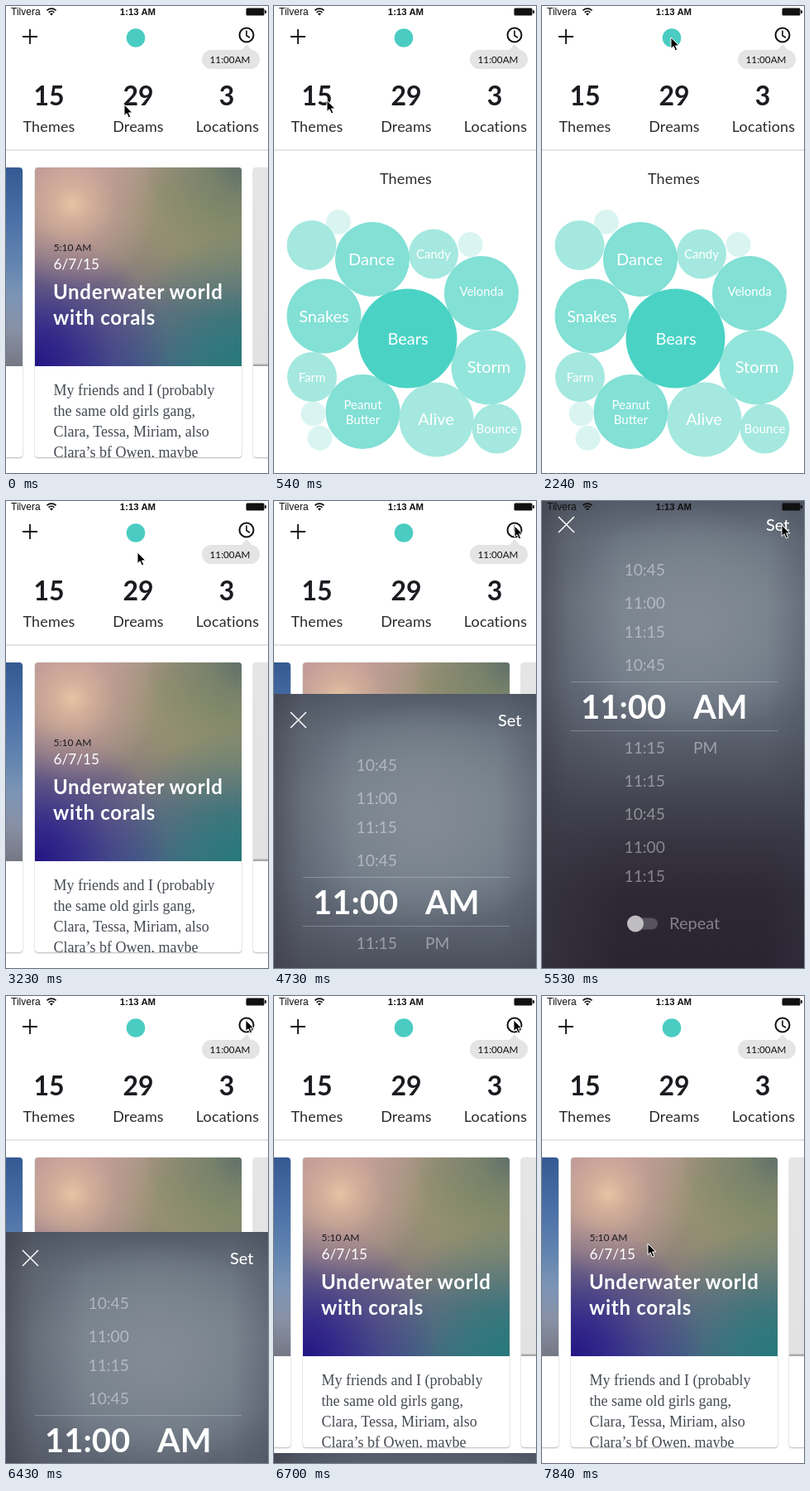
Animation, 317 px wide and 564 px high, one loop 8 s. Source, as an HTML page:

```html
<!DOCTYPE html>
<html lang="en">
<head>
<meta charset="utf-8">
<title>Dream journal</title>
<style>
  html, body { margin: 0; width: 100%; height: 100%; overflow: hidden; background: #fff; }
  .stage { position: relative; width: 317px; height: 564px; overflow: hidden; font-family: Lato, "Open Sans", sans-serif; }
  svg { position: absolute; left: 0; top: 0; width: 317px; height: 564px; overflow: visible; }
  .mid { text-anchor: middle; }
  .layer { position: absolute; inset: 0; }

  .cards { animation: cards 8s step-end infinite; }
  .themes { opacity: 0; animation: themes 8s step-end infinite; }
  @keyframes cards { 0% { opacity: 1 } 6.75% { opacity: 0 } 30.25%, 100% { opacity: 1 } }
  @keyframes themes { 0% { opacity: 0 } 6.75% { opacity: 1 } 30.25%, 100% { opacity: 0 } }

  .card { position: absolute; top: 195px; width: 250px; height: 350px; border-radius: 4px; overflow: hidden;
    background: #fff; box-shadow: 0 1px 2px rgba(0, 0, 0, .28), 0 0 1px rgba(0, 0, 0, .2); }
  .card::before { content: ""; display: block; height: 240px; background: var(--art); }
  .prev { left: -230px; --art: linear-gradient(#355a93, #4a6fa6 25%, #6184b0 48%, #7c95b6 65%, #8890a4 82%, #757784); }
  .next { left: 299px; --art: linear-gradient(#e5e5e5, #e2e2e2 98.5%, #a5a5a5 99.5%); }
  .main { left: 35px; --art:
    radial-gradient(circle at 45px 44px, #e6c3a2 0, #dcb59dcc 22px, #cca39a77 55px, #c49c9c00 105px),
    radial-gradient(circle at 0 100%, #241584 0, #30238add 45px, #42388a88 95px, #5a4f8a00 165px),
    radial-gradient(circle at 100% 100%, #27797a 0, #307a7bdd 45px, #42797988 95px, #5b7a7500 160px),
    radial-gradient(circle at 100% 0, #5f7169 0, #6b7a68aa 40px, #84886a00 120px),
    radial-gradient(ellipse 165px 125px at 218px 55px, #93956a, #8e9069bb 45%, #88886c00),
    linear-gradient(#bb9999, #ad928c 25%, #938281 45%, #7b737f 62%, #5f6484 82%, #455a89); }

  .panel { position: absolute; left: 0; top: -3px; width: 317px; height: 570px;
    transform: translateY(567px); animation: panel 8s step-end infinite;
    background:
      linear-gradient(90deg, #3a3a4599, #41424e44 34px, #4b4e5a00 95px),
      linear-gradient(270deg, #3b3f4c44, #4b4e5a00 45px),
      radial-gradient(ellipse 160px 140px at 180px 150px, #838c96, #7f8993aa 55%, #737d8900),
      linear-gradient(#535b68, #69737f 9%, #747e8a 22%, #6c7683 38%, #5a606d 50%, #484a57 61%, #383642 72%, #2d2834 84%, #2a2431); }
  .panel svg { top: 3px; }
  @keyframes panel {
    0% { transform: translateY(567px) }
    58% { transform: translateY(425px) }
    59.125% { transform: translateY(236px) }
    60.25% { transform: translateY(103px) }
    61.375% { transform: translateY(42px) }
    62.5% { transform: translateY(14px) }
    63.6% { transform: translateY(4px) }
    64.625% { transform: translateY(0) }
    80.375% { transform: translateY(288px) }
    81.5% { transform: translateY(440px) }
    82.625% { transform: translateY(520px) }
    83.75% { transform: translateY(555px) }
    84.875%, 100% { transform: translateY(567px) }
  }

  .cursor { width: 14px; height: 19px; animation: cursor 8s step-end infinite; }
  @keyframes cursor {
    0% { transform: translate(142px, 118px); animation-timing-function: steps(2) }
    2.25% { transform: translate(154px, 113px) }
    6.75% { transform: translate(63px, 113px) }
    19.01% { transform: translate(63px, 113px); animation-timing-function: steps(2) }
    21.25% { transform: translate(80px, 103px); animation-timing-function: steps(3) }
    24.625% { transform: translate(131px, 64px); animation-timing-function: steps(3) }
    28% { transform: translate(155px, 37px) }
    40.375% { transform: translate(158px, 61px); animation-timing-function: steps(3) }
    43.71% { transform: translate(178px, 135px); animation-timing-function: steps(3) }
    47.04% { transform: translate(222px, 163px); animation-timing-function: steps(3) }
    50.375% { transform: translate(261px, 99px); animation-timing-function: steps(2) }
    52.575% { transform: translate(270px, 66px); animation-timing-function: steps(3) }
    55.875% { transform: translate(290px, 29px) }
    69.125% { transform: translate(289px, 28px) }
    86% { transform: translate(289px, 28px); animation-timing-function: steps(3) }
    89.3% { transform: translate(262px, 70px); animation-timing-function: steps(4) }
    93.7% { transform: translate(165px, 215px); animation-timing-function: steps(2) }
    95.9% { transform: translate(121px, 272px) }
    97% { transform: translate(127px, 284px) }
    98%, 100% { transform: translate(127px, 298px) }
  }
</style>
</head>
<body>
<div class="stage">
  <!-- header -->
  <svg viewBox="0 0 317 564" fill="#1b1b20">
    <path d="M20 37H38M29 28V46" stroke="#111" stroke-width="1.8"/>
    <circle cx="157" cy="38.5" r="11.3" fill="#4accc2"/>
    <g fill="none" stroke="#111" stroke-width="2">
      <circle cx="291" cy="35" r="8.5"/>
      <path d="M291 29.5V35.8L295 38.3" stroke-width="1.6"/>
    </g>
    <path d="M284 54L291 46L298 54Z" fill="#e4e4e4"/>
    <rect x="237" y="53" width="70" height="23" rx="11.5" fill="#e4e4e4"/>
    <text class="mid" x="271" y="69" font-size="11.7" fill="#111">11:00AM</text>
    <g class="mid" font-size="32" font-weight="700">
      <text x="52" y="120">15</text><text x="160" y="120">29</text><text x="267" y="120">3</text>
    </g>
    <g class="mid" font-size="18" letter-spacing=".15" fill="#2b2b30">
      <text x="52" y="152">Themes</text><text x="160" y="152">Dreams</text><text x="268" y="152">Locations</text>
    </g>
    <path d="M0 174H317" stroke="#dcdcdc" stroke-width="1.6"/>
  </svg>

  <div class="layer cards">
    <div class="card prev"></div>
    <div class="card main"></div>
    <div class="card next"></div>
    <svg viewBox="0 0 317 564" fill="#fff">
      <clipPath id="face"><rect x="35" y="195" width="250" height="350"/></clipPath>
      <text x="57.5" y="296" font-size="12" fill="#1d1a20">5:10 AM</text>
      <text x="57.5" y="318" font-size="17.2">6/7/15</text>
      <g font-size="24" font-weight="700" letter-spacing=".7">
        <text x="57" y="354">Underwater world</text><text x="57" y="385">with corals</text>
      </g>
      <g clip-path="url(#face)" font-family="'Liberation Serif', Times, serif" font-size="18" fill="#454a52">
        <text x="57.5" y="469.5">My friends and I (probably</text>
        <text x="57.5" y="494.5">the same old girls gang,</text>
        <text x="57.5" y="519.5">Clara, Tessa, Miriam, also</text>
        <text x="57.5" y="544.5">Clara’s bf Owen, maybe</text>
      </g>
    </svg>
  </div>

  <svg class="themes mid" viewBox="0 0 317 564">
    <text x="159.5" y="214.5" font-size="18" letter-spacing=".15" fill="#2b2b30">Themes</text>
    <g fill="#daf5f1">
      <circle cx="78" cy="261" r="15"/><circle cx="237.5" cy="288" r="15"/>
      <circle cx="47.5" cy="492.5" r="15"/><circle cx="55.5" cy="522" r="15"/>
    </g>
    <g fill="#a4e8df">
      <circle cx="45.5" cy="289" r="30"/><circle cx="193" cy="299.5" r="30"/>
      <circle cx="46" cy="448" r="30"/><circle cx="269.5" cy="510.5" r="30"/>
      <circle cx="196.5" cy="499.5" r="45"/>
    </g>
    <g fill="#82e0d5">
      <circle cx="119" cy="306" r="45"/><circle cx="251" cy="347" r="45"/>
      <circle cx="60.5" cy="374.5" r="45"/><circle cx="107.5" cy="490" r="45"/>
    </g>
    <circle cx="259.5" cy="436.5" r="45" fill="#93e5db"/>
    <circle cx="161.5" cy="401.5" r="60" fill="#4ad3c5"/>
    <g fill="#fff" font-size="20">
      <text x="118" y="313">Dance</text><text x="60.5" y="381.5">Snakes</text>
      <text x="162" y="409">Bears</text><text x="260" y="443">Storm</text>
      <text x="196" y="506">Alive</text>
    </g>
    <g fill="#fff" font-size="15">
      <text x="193" y="304.5">Candy</text><text x="251" y="350">Velonda</text>
      <text x="46" y="453.5">Farm</text><text x="107.5" y="486.5">Peanut</text>
      <text x="107.5" y="504.5">Butter</text><text x="269.5" y="515.5">Bounce</text>
    </g>
  </svg>

  <div class="panel">
    <svg viewBox="0 0 317 564" fill="#fff">
      <path d="M20 19L39 38M39 19L20 38" stroke="#fff" stroke-width="1.5"/>
      <text x="299.5" y="35.5" font-size="20" font-weight="500" text-anchor="end">Set</text>
      <g font-size="19.2" fill-opacity=".42">
        <text x="99.5" y="90">10:45</text><text x="99.5" y="130">11:00</text>
        <text x="99.5" y="165">11:15</text><text x="99.5" y="205">10:45</text>
        <text x="99.5" y="305">11:15</text><text x="183" y="305">PM</text>
        <text x="99.5" y="345">11:15</text><text x="99.5" y="385">10:45</text>
        <text x="99.5" y="425">11:00</text><text x="99.5" y="460">11:15</text>
        <text x="154" y="517" font-size="20">Repeat</text>
      </g>
      <path d="M35 218.5H285M35 277.5H285" stroke="#fff" stroke-opacity=".25"/>
      <g font-size="40" font-weight="700">
        <text x="47" y="263">11:00</text><text x="183" y="263">AM</text>
      </g>
      <rect x="103" y="503.5" width="37" height="14" rx="7" fill="#56535e"/>
      <circle cx="113" cy="510.5" r="10" fill="#bebdc1"/>
    </svg>
  </div>

  <!-- status bar -->
  <svg viewBox="0 0 317 564" font-family="'Liberation Sans', Arial, sans-serif" fill="#111">
    <text x="6" y="11" font-size="12">Tilvera</text>
    <g fill="none" stroke="#111" stroke-width="1.7">
      <path d="M49.5 5.4A8 8 0 0 1 60.5 5.4M51.6 7.8A5 5 0 0 1 58.4 7.8"/>
    </g>
    <path d="M53 9.4A3 3 0 0 1 57 9.4L55 11.6Z"/>
    <text class="mid" x="159.5" y="11" font-size="11.4" font-weight="700">1:13 AM</text>
    <rect x="290.5" y="2.5" width="22" height="9" rx="1.5"/>
    <rect x="313" y="5" width="2" height="4" rx="1"/>
  </svg>

  <svg class="cursor" viewBox="0 0 14 19">
    <path d="M1 1V14.6L4.1 11.7L6.4 17L8.8 16L6.5 10.9H10.9Z" fill="#000" stroke="#fff"/>
  </svg>
</div>
</body>
</html>
```
